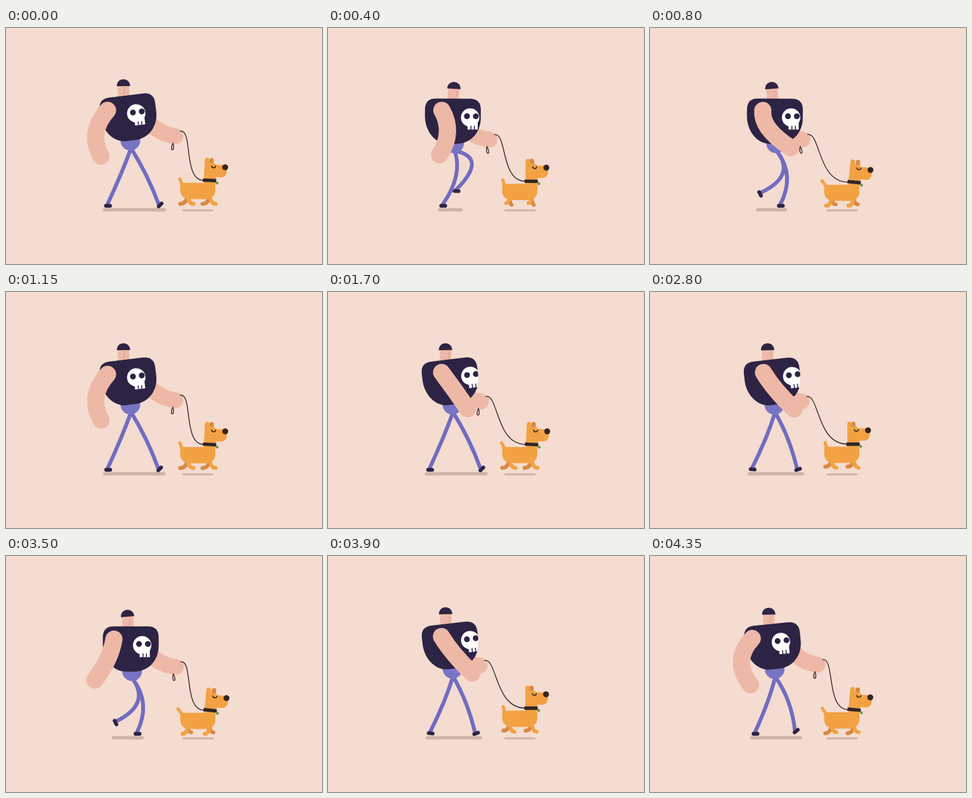
Recreate the animation shown at these times as an HTML page with a canvas. Size 498x373 px, loop 4.4 s.

```html
<!DOCTYPE html>
<html lang="en">
<head>
<meta charset="utf-8">
<title>Dog walk</title>
<style>
html, body { margin: 0; width: 100%; height: 100%; overflow: hidden; background: #f4dcd0; }
canvas { display: block; }
</style>
</head>
<body>
<canvas id="stage" width="498" height="373"></canvas>
<script>
const c = document.getElementById('stage').getContext('2d');
const { sin, cos, min, max, PI } = Math;
const SKIN = '#eeb8a7', DARK = '#2d2344', JEANS = '#716cc0', SHADE = '#ceb5aa',
      DOG = '#f2a243', DOG_FAR = '#d98843', LEASH = '#3a2a2c';

function stroke(color, width, path) {
  c.strokeStyle = color;
  c.lineWidth = width;
  c.stroke(new Path2D(path));
}
function fill(color, path) {
  c.fillStyle = color;
  c.fill(new Path2D(path));
}
function dot(color, x, y, r) {
  c.fillStyle = color;
  c.beginPath();
  c.arc(x, y, r, 0, 7);
  c.fill();
}
function at(x, y, deg, draw) {
  c.save();
  c.translate(x, y);
  c.rotate(deg * PI / 180);
  draw();
  c.restore();
}
const bar = (x1, x2, y, w) => stroke(SHADE, w, `M${x1 + w / 2},${y}H${x2 - w / 2}`);
const hump = x => sin(PI * x) ** 2;

// A foot slides back during one step (stance), then swings forward during the next.
function footPose(u) {
  const swinging = u % 2 >= 1, w = u % 1;
  if (!swinging) return {
    x: 241 - 81.5 * (w + .28 * w * (1 - w)),
    y: 279.5,
    bendX: 4 + 27 * hump(w),
    bendY: -4,
    tilt: -45 * max(0, 1 - 6 * w)
  };
  const lift = hump(w ** 1.2);
  return {
    x: 159.5 + 81.5 * w ** 1.75,
    y: 279.5 - 28 * lift,
    bendX: 4 + 58 * lift,
    bendY: -4 + 22 * lift * sin(2 * PI * w),
    tilt: 150 * hump(w) * (1 - w) - 45 * w
  };
}

function leg(foot, hx, hy) {
  const { x, y, bendX, bendY, tilt } = foot;
  stroke(JEANS, 6, `M${hx},${hy}Q${(hx + x) / 2 + bendX},${(hy + y) / 2 + bendY} ${x},${y}`);
  at(x, y, tilt, () => stroke(DARK, 5.8, 'M-2,1.5H4.5'));
}

function skull() {
  dot('#fff', 0, 0, 14.5);
  fill('#fff', 'M-4,8H12V19H-4Z');
  dot(DARK, -5, -2, 4.6);
  dot(DARK, 9, -2, 4.6);
  c.lineCap = 'butt';
  stroke(DARK, 1.5, 'M1.3,13V19.5M6.7,13V19.5');
  c.lineCap = 'round';
}

function leash(x, y, collarX, collarY, lean) {
  const sx = x + 8, sy = y - 8;
  stroke(LEASH, 1.4, `M${sx},${sy}C${sx + 20},${sy - 3} ${sx * .56 + 124.6},${collarY} ${collarX},${collarY}`);
  at(x - 4, y + 11, 0, () => stroke(LEASH, 1.4, `M0,0C${lean - 6},14 ${lean + 6},14 0,0`));
}

function head(x, y, tilt, noseX) {
  at(x, y, tilt, () => {
    fill(SKIN, 'M-9,-2H9V24H-9Z');
    stroke('#d99c8b', .9, `M${noseX},3V11Q${noseX},13 ${noseX - 2.5},12.5`);
    fill(DARK, 'M-10.5,0C-10.5,-14.5 10.5,-14.5 10.5,0Z');
  });
}

function man(u, collarX, collarY) {
  const turn = cos(PI * u), lead = sin(PI * u);   // arm swing, every two steps
  const dip = hump(u - .03);                      // body bob, every step
  const sway = dip * sin(2 * PI * u);

  const feet = [footPose(u + 1), footPose(u)];
  const footX = feet.map(f => f.x);
  bar(min(...footX) - 7, max(...footX) + 11, 287.3, 5.4);

  const farX = 254 + 13 * turn + 9 * lead, farY = 172 - turn + 5 * dip;
  stroke(SKIN, 25, `M220,${149 - 7 * turn + 3 * dip}Q${farX - 30},${farY - 4} ${farX},${farY}`);
  leash(farX, farY, collarX, collarY, 4 * dip - 1);

  const hx = 196 + 3.5 * dip, hy = 178 + 5.5 * dip;
  for (const foot of feet) leg(foot, hx + 1, hy + 12);
  dot('#7873c4', hx, hy, 15.5);

  head(185 + 12.5 * dip - 5 * sway, 91.8 + 5.5 * dip, -1 - 6 * sway, 3.7 - 2.2 * turn);

  at(193.6 + 4 * dip, 142 + 6.4 * dip, 9.3 * dip - 7, () => {
    const shirt = 'M-27,-35.5H27Q44,-35.5 44,-18V-5C44,20 26,36 6,36H-8C-28,36 -44,16 -44,-8V-18Q-44,-35.5 -27,-35.5Z';
    fill(DARK, shirt);
    c.clip(new Path2D(shirt));
    c.translate(22 - 9.6 * turn, -5.7);
    skull();
  });

  const x = 169.5 - 9.5 * turn + 6 * dip, y = 128.5 + 1.5 * turn + 3 * dip;
  const handX = 185 - 46 * cos(PI * (u - .22)) - 5 * dip;
  const handY = 193.5 + 9 * turn + 6 * dip - 10 * sway;
  const bow = 25 * lead + 8 * dip - 13 * (1 + turn);
  stroke(SKIN, 27, `M${x},${y}Q${(x + handX) / 2 + bow},${(y + handY) / 2 - 1} ${handX},${handY}`);
}

function dogLegs(color, u, drop) {
  const a = 2 * PI * u, dx = 10.5 * cos(a);
  const y = 277.5 + drop + 3 * min(0, sin(a));
  for (const x of [285, 320])
    stroke(color, 6, `M${x + 1},${265 + drop}Q${x + 1 + dx * .2},${y} ${x + dx},${y}`);
}

function dog(u, { x, y, tilt, drop }) {
  const spread = 2 + drop / 4;
  bar(279 - spread / 2, 325 + spread, 288.3, 3);
  dogLegs(DOG_FAR, u + .5, drop);
  stroke(DOG, 5, `M279,${249 + drop}L${276 - .85 * tilt},${238 + drop}`);
  c.fillStyle = DOG;
  c.beginPath();
  c.roundRect(274.5, 244.3 + drop, 55.5, 25.7, [3, 3, 14, 14]);
  c.fill();
  dogLegs(DOG, u, drop);

  at(x, y, tilt, () => {
    const ear = .5 + tilt * .4;
    stroke(DOG_FAR, 7, `M${ear},-25V-32`);
    stroke(DOG, 7, 'M-5.5,-24V-32');
    fill(DOG, 'M-9,7V-28H5L9,-25H20Q27,-25 26.5,-14Q25,-5.5 18,-5.5H11Q9,-5 9,-2V7Z');
    dot('#33261f', 23.6, -21.8, 4.7);
    stroke('#33261f', 1.6, 'M2,-23A3.3,3.3 0 0 0 8.5,-23');
    fill('#2f2528', 'M-10.5,-2.7H10.5V2.7H-10.5Z');
    dot('#6d9a4c', 12, 3.6, 2.4);
  });
}

// The dog bobs twice per human step.
function dogPose(u) {
  const wave = shift => cos(2 * PI * (2 * u - shift));
  const drop = 2 - 2 * wave(.12), tilt = 2.8 - 3 * wave(.24);
  return { x: 320 + .3 * tilt, y: 240.3 + drop, tilt, drop };
}

// Eight steps per loop, with a slight lag in the first half.
const steps = t => t / 550 - .1 * max(0, sin(PI * t / 2800));

const start = performance.now();
function frame() {
  const t = Math.floor((performance.now() - start) / 50) * 50 % 4400;
  const u = (steps(t) + 2) % 2;
  const pose = dogPose(u);
  c.fillStyle = '#f4dcd0';
  c.fillRect(0, 0, 498, 373);
  c.lineCap = c.lineJoin = 'round';
  man(u, pose.x - 9, pose.y);
  dog(u, pose);
  requestAnimationFrame(frame);
}
frame();
</script>
</body>
</html>
```
